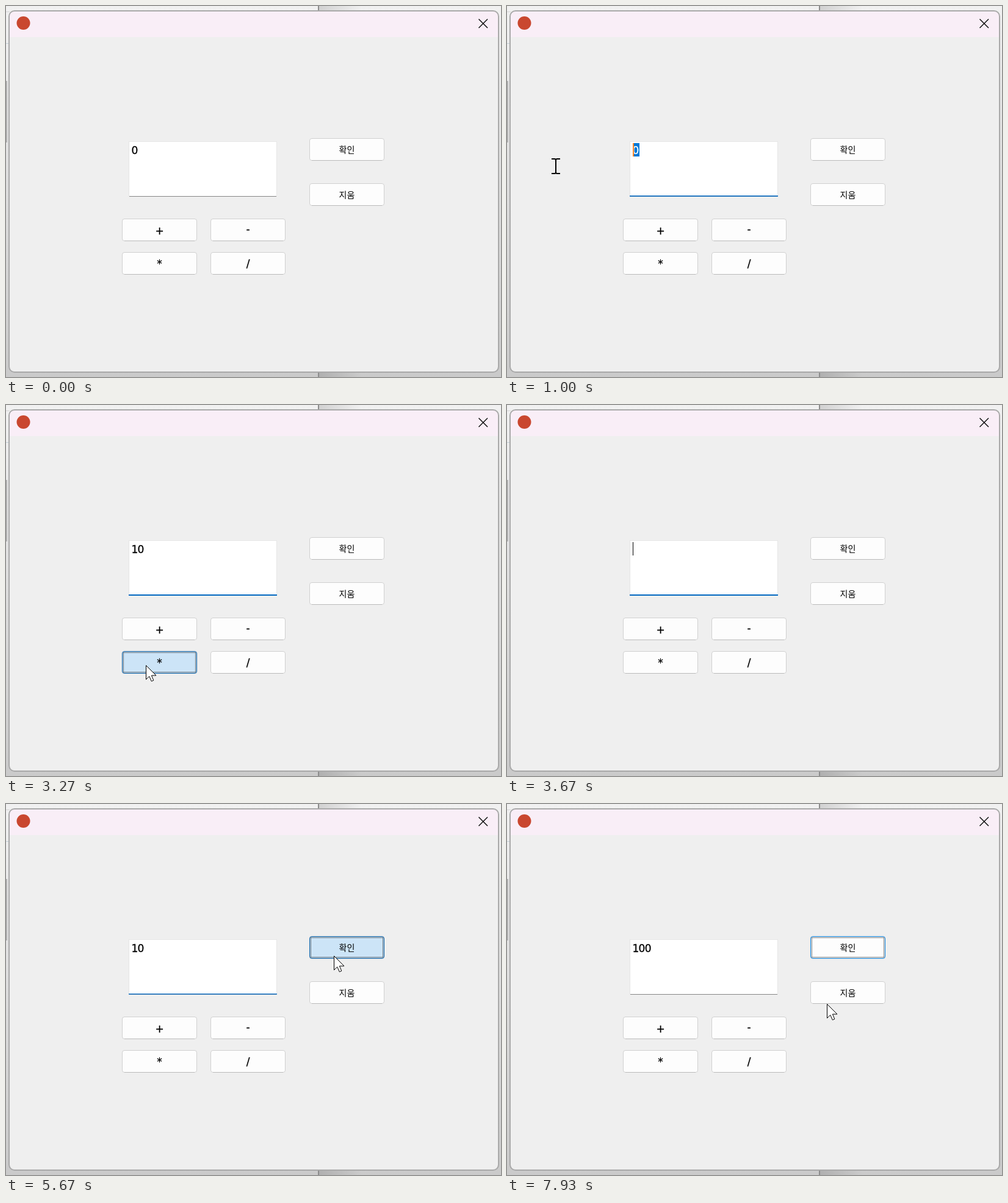
An HTML page that plays this animation: 811x609 px, repeating every 8000 ms.

```html
<!DOCTYPE html>
<html lang="ko">
<head>
<meta charset="utf-8">
<title>Calculator dialog</title>
<style>
  html, body { margin: 0; width: 100%; height: 100%; overflow: hidden; background: #e4e4e4; }
  svg { display: block; width: 811px; height: 609px; }
  text {
    font: 17px "DejaVu Sans", sans-serif; white-space: pre;
    fill: currentColor; stroke: currentColor; stroke-width: .3px;
  }
  .label { text-anchor: middle; }
  .korean { font: 14px "Noto Sans CJK KR", "Noto Sans CJK", sans-serif; stroke: none; }
  .face { fill: #fdfdfd; stroke: #d0d0d0; }
  .edge { stroke: #bababa; }
  .hot { opacity: 0; }
  .dots { fill: none; stroke: #000; stroke-dasharray: 1 1; opacity: 0; }
  #arrow, #beam, #select, #mark, #focus, #strip { opacity: 0; }
</style>
</head>
<body>
<svg viewBox="0 0 811 609">
  <defs>
    <linearGradient id="shade" x2="0" y2="1">
      <stop offset="0" stop-color="#f1f1f1"/>
      <stop offset=".25" stop-color="#e6e6e6"/>
      <stop offset="1" stop-color="#cacaca"/>
    </linearGradient>
    <linearGradient id="cast">
      <stop offset="0" stop-opacity=".13"/>
      <stop offset="1" stop-opacity="0"/>
    </linearGradient>
    <clipPath id="frame"><rect x="5" y="8" width="802" height="593" rx="9"/></clipPath>
  </defs>

  <!-- desktop behind the dialog -->
  <rect width="811" height="609" fill="url(#shade)"/>
  <rect x="513" width="70" height="609" fill="url(#cast)"/>
  <path d="M0 9.5H6" stroke="#d6d6d6"/>
  <path d="M0 61.5H6" stroke="#c3d0d6"/>
  <rect id="strip" y="82" width="5" height="177" fill="#c8dbec"/>
  <rect y="123" width="2" height="101" fill="#b2b2b2"/>
  <path d="M512 0V609" stroke="#8c8c8c" stroke-width="2"/>

  <!-- dialog -->
  <g clip-path="url(#frame)">
    <rect width="811" height="609" fill="#efefef"/>
    <rect width="811" height="51" fill="#f9eef7"/>
  </g>
  <rect x="5" y="8" width="802" height="593" rx="9" fill="none" stroke="#a9a9a9" stroke-width="2"/>
  <circle cx="28.5" cy="28" r="11" fill="#c9472f"/>
  <path d="M774.5 21.5l14.5 14.5m0-14.5l-14.5 14.5" stroke="#111" stroke-width="1.5"/>

  <!-- edit box -->
  <rect x="201.5" y="222.5" width="242" height="90" fill="#fff" stroke="#e6e6e6"/>
  <path d="M202 312.5H443" stroke="#868686"/>
  <rect id="focus" x="201" y="311" width="243" height="2" fill="#0067c0"/>
  <rect id="select" x="206" y="225" width="11" height="22" fill="#0078d7"/>
  <text id="value" x="205.6" y="242.5" letter-spacing="-.8"></text>
  <rect id="mark" x="206" y="225" width="2" height="22" fill="#ff8728"/>
  <rect id="caret" y="225" width="1" height="22"/>

  <g id="buttons"></g>

  <path id="beam" d="M-7-12H-2Q0-12 0-10Q0-12 2-12H7M-7 12H-2Q0 12 0 10Q0 12 2 12H7M0-11V11"
    fill="none" stroke="#000" stroke-width="2"/>
  <path id="arrow" d="M.5.5V23.5L5.8 18.4 9.3 26.5 12.8 25 9.4 17H17Z" fill="#fff" stroke="#000"/>
</svg>

<script>
const LOOP = 8000, FPS = 15, BLINK = 530, FADE = 200;
const $ = id => document.getElementById(id);
const tracks = [];

// keys: [ms, value, easing towards the next key]; the last value holds until the loop restarts
function track(el, prop, keys, ease = 'linear') {
  const all = [...keys, [LOOP, keys.at(-1)[1]]];
  if (all[0][0] > 0) all.unshift([0, all[0][1]]);
  const frames = all.map(([ms, value, easing = ease]) => ({ offset: ms / LOOP, [prop]: value, easing }));
  const anim = el.animate(frames, { duration: LOOP, iterations: Infinity });
  anim.pause();
  tracks.push(anim);
}

// spans: [start, end] times at which the element is visible
function show(el, ...spans) {
  const keys = spans.flatMap(([on, off]) => off < LOOP ? [[on, 1], [off, 0]] : [[on, 1]]);
  track(el, 'opacity', [[0, 0], ...keys], 'step-end');
}

function fade(el, on, off, time = FADE) {
  track(el, 'opacity', [[0, 0], [on, 0], [on + time, 1], [off, 1], [off + time, 0]]);
}

function move(el, ...points) {
  track(el, 'transform', points.map(([ms, x, y, easing]) => [ms, `translate(${x}px, ${y}px)`, easing]));
}

function button(x, y, label, baseline, font = '') {
  const g = document.createElementNS('http://www.w3.org/2000/svg', 'g');
  g.setAttribute('transform', `translate(${x} ${y})`);
  const box = 'x=".5" y=".5" width="122" height="36" rx="3.5"';
  g.innerHTML = `<rect class="face" ${box}/><path class="edge" d="M4 36.5H119"/>
    <rect class="hot" ${box} fill="#e0eef9" stroke="#0078d4"/>
    <rect class="dots" x="2.5" y="2.5" width="118" height="32"/>
    <text class="label ${font}" x="61.5" y="${baseline}">${label}</text>`;
  $('buttons').append(g);
  return { hot: g.querySelector('.hot'), dots: g.querySelector('.dots') };
}

// fill and border while held down; cool is the fill after the pointer leaves
function press({ hot, dots }, down, up, leave, blur, cool = '#e0eef9') {
  track(hot, 'fill', [[0, '#e0eef9'], [down - 70, '#e0eef9'], [down, '#cce4f7'], [up, '#cce4f7'],
    [up + 70, '#e0eef9'], [leave, '#e0eef9'], [leave + FADE, cool]]);
  track(hot, 'stroke', [[0, '#0078d4'], [down - 70, '#0078d4'], [down, '#005499'], [up, '#005499'], [up + 70, '#0078d4']]);
  show(dots, [down, blur]);
}

button(190, 349, '+', 25.5);
const minus = button(335, 349, '-', 23);
const times = button(190, 404, '*', 24.5);
button(335, 404, '/', 24.5);
const ok = button(497, 217, '확인', 24, 'korean');
button(497, 291, '지움', 24, 'korean');

fade(times.hot, 3000, 3400);
press(times, 3270, 3330, 3400, 3330);
fade(ok.hot, 5400, LOOP - FADE * 2);
tracks.pop();
track(ok.hot, 'opacity', [[0, 0], [5400, 0], [5400 + FADE, 1]]); // keeps its border while focused
press(ok, 5670, 5800, 6070, LOOP, '#fdfdfd');
fade(minus.hot, 7670, 7800, 130);

fade($('focus'), 800, 5600, 250);
fade($('strip'), 3670, 5000, 70);
show($('select'), [930, 2130]);
show($('mark'), [930, 930 + BLINK]);
track($('value'), 'color', [[0, '#000'], [930, '#fff'], [2130, '#000']], 'step-end');

show($('arrow'), [200, 270], [330, 670], [1130, 2130], [2870, 3670], [5070, 6330], [7670, LOOP]);
move($('arrow'),
  [200, 598, 294], [330, 94, 263], [470, 94, 263], [670, 200, 263],
  [1130, 77, 260], [2870, 77, 260, 'ease-in-out'], [3200, 229, 427], [3330, 229, 427, 'ease-in'], [3600, 35, 216],
  [5070, 20, 290], [5200, 200, 328, 'ease-out'], [5530, 537, 249], [6000, 537, 249, 'ease-in'], [6270, 740, 247],
  [7670, 543, 360], [7730, 440, 358, 'ease-in'], [7930, 524, 328]);
show($('beam'), [270, 330], [670, 1130]);
move($('beam'), [270, 300, 285], [670, 235, 266], [730, 263, 267], [800, 263, 267, 'ease-in-out'], [1000, 80, 263]);

// [ms, text]; each entry restarts the caret blink
const typing = [[0, '0'], [2130, '1'], [2400, '10'], [3330, ''], [3670, ''], [4200, '1'], [4470, '10'], [5870, '100']];
const CARET_ON = 2130, CARET_OFF = 5600;

function draw(now) {
  // tolerance and lead absorb rounded frame and key times
  const frame = Math.floor(now * FPS / 1000 + .1);
  const t = (frame * 1000 / FPS + 5) % LOOP;
  tracks.forEach(a => a.currentTime = t);
  const [at, text] = typing.findLast(([ms]) => ms <= t);
  const lit = t >= CARET_ON && t < CARET_OFF && Math.floor((t - at) / BLINK) % 2 === 0;
  $('value').textContent = text;
  $('caret').setAttribute('x', 206 + 10 * text.length);
  $('caret').setAttribute('opacity', +lit);
}

let start;
function tick(now) {
  start ??= now;
  draw(now - start);
  requestAnimationFrame(tick);
}
draw(0);
requestAnimationFrame(tick);
</script>
</body>
</html>
```
